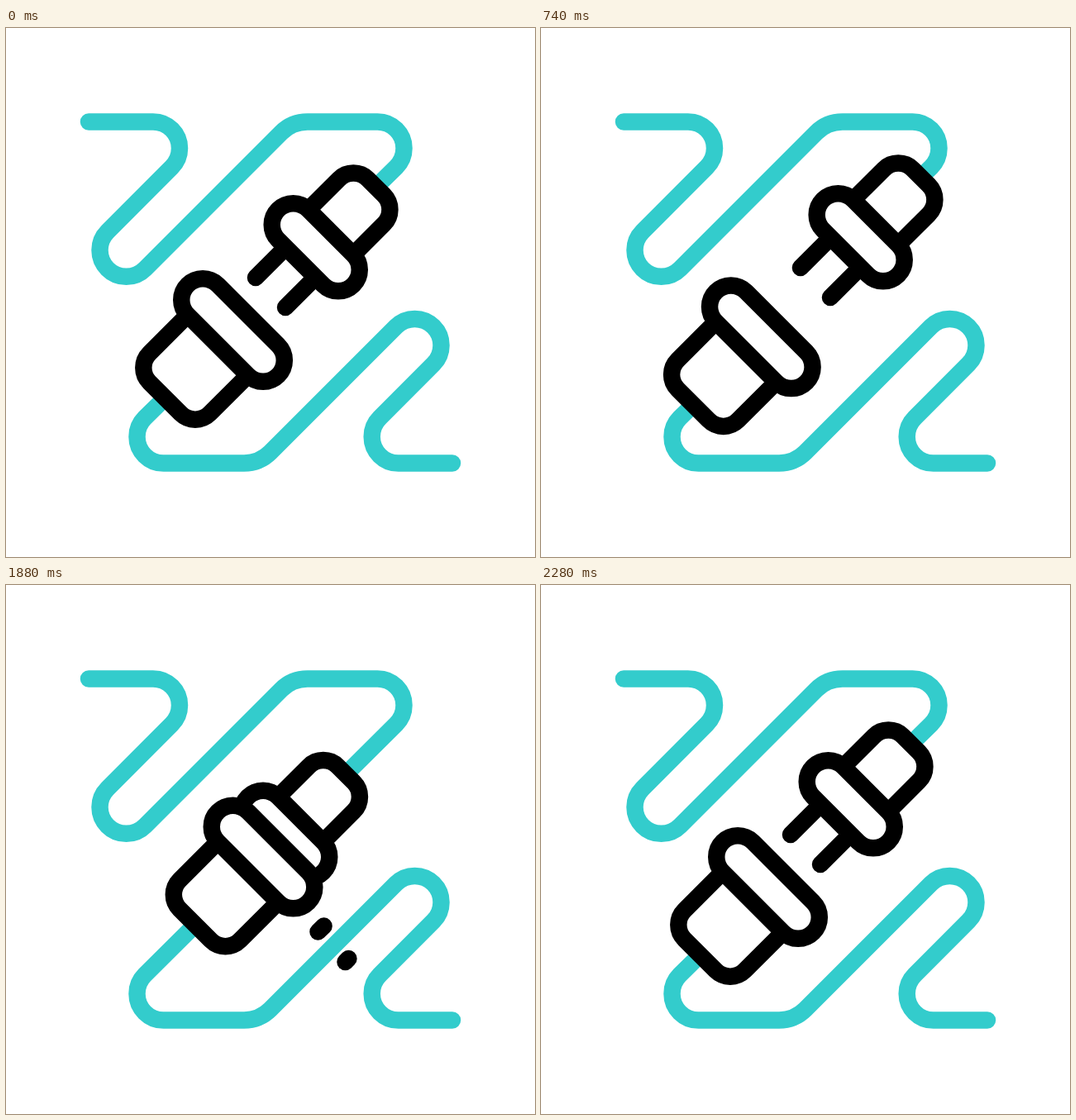
Animation of 640 by 640 pixels, one loop 2.42 s. Source, as an HTML page with a canvas:

```html
<!DOCTYPE html>
<html lang="en">
<head>
<meta charset="utf-8">
<title>Plug and socket</title>
<style>
  html, body { margin: 0; width: 100%; height: 100%; overflow: hidden; background: #fff; }
  canvas { display: block; width: 100vw; height: 100vh; }
</style>
</head>
<body>
<canvas id="stage" width="640" height="640"></canvas>
<script>
const ctx = document.getElementById('stage').getContext('2d');
const LOOP = 2420, STEP = 20, WIDTH = 20.5, TEAL = '#33cccc', INK = '#000';
const clamp = x => Math.min(1, Math.max(0, x));
const mix = (a, b, k) => a + (b - a) * k;
const span = (t, a, b) => clamp((t - a) / (b - a));
const easeOut = k => 1 - Math.pow(1 - k, 2.8);

// Cubic curve with handles (a, 0) and (b, 1), solved by bisection.
function easeBoth(x, a, b) {
  let lo = 0, hi = 1, s = 0.5;
  for (let i = 0; i < 24; i++) {
    s = (lo + hi) / 2;
    const r = 1 - s;
    if (3 * r * r * s * a + 3 * r * s * s * b + s * s * s < x) lo = s; else hi = s;
  }
  return s * s * (3 - 2 * s);
}

// Distance of a part from rest along the diagonal; positive is apart.
function offset(t, far) {
  const near = -51;
  if (t < 680) return far * easeOut(span(t, 120, 660));
  if (t < 1680) return mix(far, near, easeBoth(span(t, 660, 980), 0.33, 0.67));
  return mix(near, 0, easeBoth(span(t, 1680, 2280), 0.42, 0.43));
}

// d: distance of the attached part; cut: how much shorter the hairpin is.
function cable(d, cut) {
  const q = Math.PI / 4, r = 32;
  ctx.beginPath();
  ctx.moveTo(100, 113.5);
  ctx.arc(178 - cut, 145.5, r, -2 * q, q);
  ctx.arc(145.5, 268.8 - cut, r, 5 * q, q, true);
  ctx.arcTo(346 - cut, 113.5, 440, 113.5, 45);
  ctx.arc(449.5, 145.5, r, -2 * q, q);
  const end = Math.min(d, 21);
  ctx.lineTo(451 + end, 189 - end);
  ctx.strokeStyle = TEAL;
  ctx.stroke();
}

function paint() {
  ctx.fill();
  ctx.stroke();
}

// Housing and collar, pointing along +x from the centre of the stage.
function housing(collar, half) {
  const r = 25.8, end = 180.4;
  ctx.strokeStyle = INK;
  ctx.fillStyle = '#fff';
  ctx.beginPath();
  ctx.moveTo(collar + r, -half);
  ctx.arcTo(end, -half, end, 0, 25);
  ctx.arcTo(end, half, collar, half, 25);
  ctx.lineTo(collar + r, half);
  paint();
  ctx.beginPath();
  ctx.arc(collar, -half, r, Math.PI, 0);
  ctx.arc(collar, half, r, 0, Math.PI);
  ctx.closePath();
  paint();
}

function prongs() {
  ctx.strokeStyle = INK;
  ctx.beginPath();
  for (const v of [-25.5, 25.5]) {
    ctx.moveTo(0, v);
    ctx.lineTo(52, v);
  }
  ctx.stroke();
}

function along(angle, d, draw) {
  ctx.save();
  ctx.translate(320, 320);
  ctx.rotate(angle);
  ctx.translate(d * Math.SQRT2, 0);
  draw();
  ctx.restore();
}

// A stroke that grows from its first end, then shrinks into its last.
function streak(t, start, stop, x1, y1, x2, y2, color) {
  const k = span(t, start, stop);
  if (k <= 0 || k >= 1) return;
  const head = clamp(2 * k), tail = clamp(2 * k - 1);
  ctx.strokeStyle = color;
  ctx.beginPath();
  ctx.moveTo(mix(x1, x2, tail), mix(y1, y2, tail));
  ctx.lineTo(mix(x1, x2, head), mix(y1, y2, head));
  ctx.stroke();
}

function draw(t) {
  const plug = offset(t, 23.7), socket = offset(t, 19.3);
  ctx.fillStyle = '#fff';
  ctx.fillRect(0, 0, 640, 640);
  ctx.lineCap = 'round';
  ctx.lineJoin = 'round';
  ctx.lineWidth = WIDTH;

  cable(plug, 0);
  ctx.save();
  ctx.translate(640, 640);
  ctx.rotate(Math.PI);
  cable(socket, 12.7);
  ctx.restore();

  streak(t, 800, 980, 288, 138, 191, 235, TEAL);
  streak(t, 2020, 2220, 191, 235, 288, 138, TEAL);
  streak(t, 1860, 2140, 377.5, 419.5, 427, 371, INK);
  streak(t, 1860, 2140, 410.5, 456, 438, 428.5, INK);
  if (t >= 980 && t < 1680) {
    ctx.fillStyle = '#eefbfb';
    ctx.beginPath();
    ctx.arc(191, 235, WIDTH / 2, 0, 2 * Math.PI);
    ctx.fill();
  }

  along(-Math.PI / 4, plug, () => { prongs(); housing(77.4, 38.5); });
  along(Math.PI * 3 / 4, socket, () => housing(64.3, 51.6));
}

const began = performance.now();
function tick() {
  const t = (performance.now() - began) % LOOP;
  draw(Math.floor(t / STEP) * STEP);
  requestAnimationFrame(tick);
}
tick();
</script>
</body>
</html>
```
